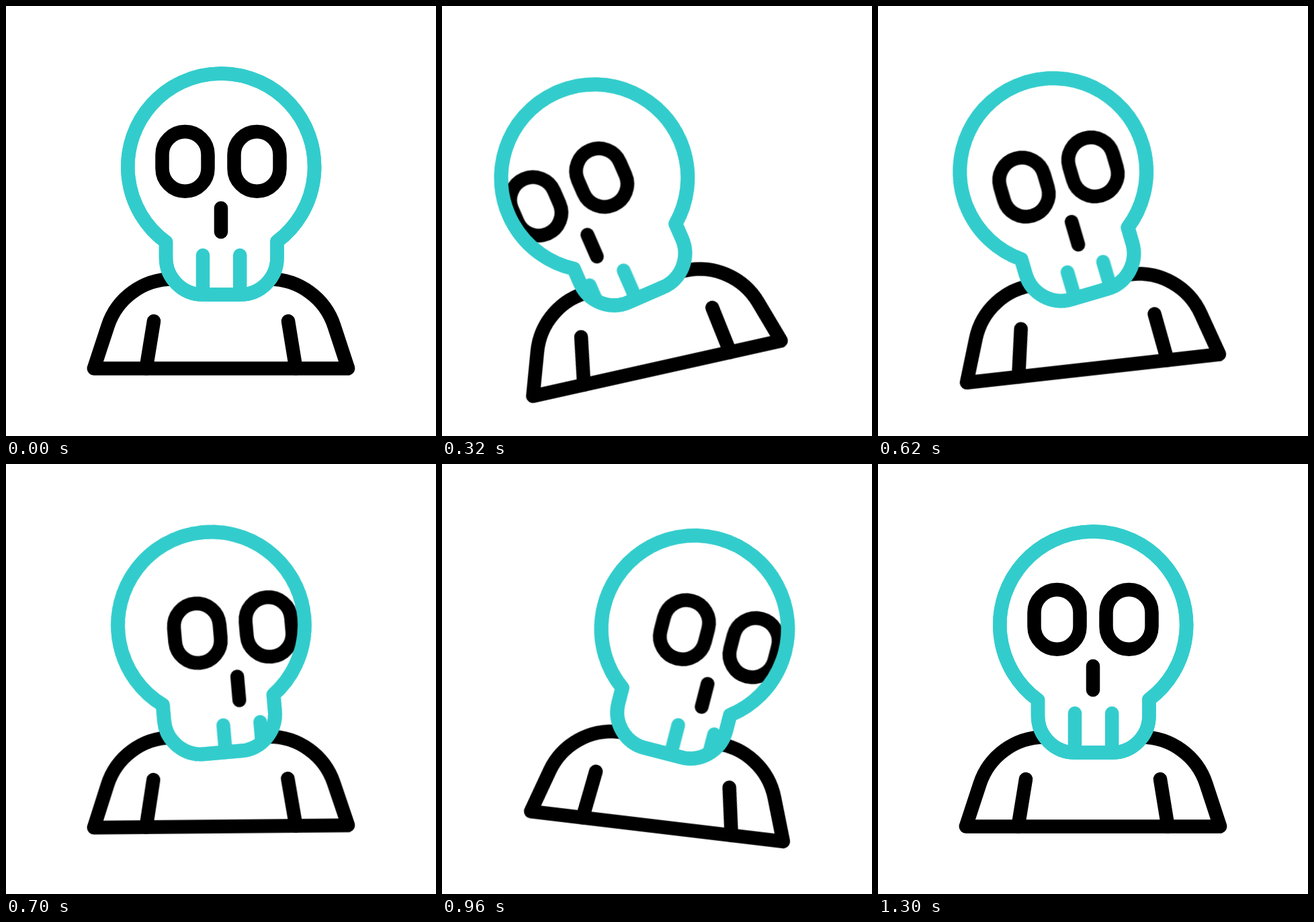
An HTML page for the animation above (2.4 s loop, 640 px wide and 640 px high).

```html
<!DOCTYPE html>
<html lang="en">
<head>
<meta charset="utf-8">
<title>Swaying skeleton</title>
<style>
  html, body { margin: 0; width: 100%; height: 100%; overflow: hidden; background: #fff; }
  svg { display: block; width: 100%; height: 100%; }

  .line { fill: none; stroke: #000; stroke-width: 20.5; stroke-linecap: round; stroke-linejoin: round; }
  .teal { stroke: #33cccc; }
  .solid { fill: #fff; }

  .figure, .head, .slide, .drop { animation: 2.4s cubic-bezier(.333, 0, .667, 1) infinite; }
  .figure { transform-origin: 320px 539.5px; animation-name: sway; }
  .head { transform-origin: 320px 393px; animation-name: tilt; }
  .slide { animation-name: slide; }
  .drop { animation-name: drop; }

  @keyframes sway {
    0% { transform: rotate(0deg); }
    17.92% { transform: rotate(-15deg); }
    36.83% { transform: rotate(7.5deg); }
    53.9%, 100% { transform: rotate(0deg); }
  }
  @keyframes tilt {
    0%, 1.375% { transform: rotate(0deg); }
    19.58% { transform: rotate(-15deg); animation-timing-function: cubic-bezier(.333, 0, .667, .667); }
    37.29% { transform: rotate(9.4deg); animation-timing-function: cubic-bezier(.333, .333, .667, 1); }
    54.17%, 100% { transform: rotate(0deg); }
  }
  @keyframes slide {
    0% { transform: translateX(0px); }
    18.04% { transform: translateX(-52px); animation-timing-function: cubic-bezier(.3, 0, .5, 1); }
    34.71% { transform: translateX(48.3px); }
    54.17%, 100% { transform: translateX(0px); }
  }
  @keyframes drop {
    0% { transform: translateY(0px); animation-timing-function: cubic-bezier(.45, 0, .667, 1); }
    18.04% { transform: translateY(15px); }
    27% { transform: translateY(18.2px); }
    34.71% { transform: translateY(17.6px); animation-timing-function: cubic-bezier(.2, 0, .667, 1); }
    54.17%, 100% { transform: translateY(0px); }
  }
</style>
</head>
<body>
<svg viewBox="0 0 640 640">
  <defs>
    <path id="skull" d="M238 351.3A138.9 138.9 0 1 1 403.5 350.5V374.5A55 55 0 0 1 348.5 429.5H293A55 55 0 0 1 238 374.5Z"/>
    <clipPath id="inside"><use href="#skull"/></clipPath>
  </defs>

  <g class="figure">
    <path class="line solid" d="M130.8 539.5L151.5 476.5A101.3 101.3 0 0 1 247.8 406.6H392.2A101.3 101.3 0 0 1 488.5 476.5L509.2 539.5Z"/>
    <path class="line" d="M220 469L208.5 539.5M420 469L431.5 539.5"/>

    <g class="head">
      <use class="line teal solid" href="#skull"/>
      <g clip-path="url(#inside)">
        <g class="slide"><g class="drop">
          <rect class="line" x="232.5" y="187" width="68" height="88.7" rx="34"/>
          <rect class="line" x="339.5" y="187" width="68" height="88.7" rx="34"/>
          <path class="line" d="M320 300.7V336.3"/>
          <path class="line teal" d="M293 371V429.5M348.2 371V429.5"/>
        </g></g>
      </g>
      <use class="line teal" href="#skull"/>
    </g>
  </g>
</svg>
</body>
</html>
```
